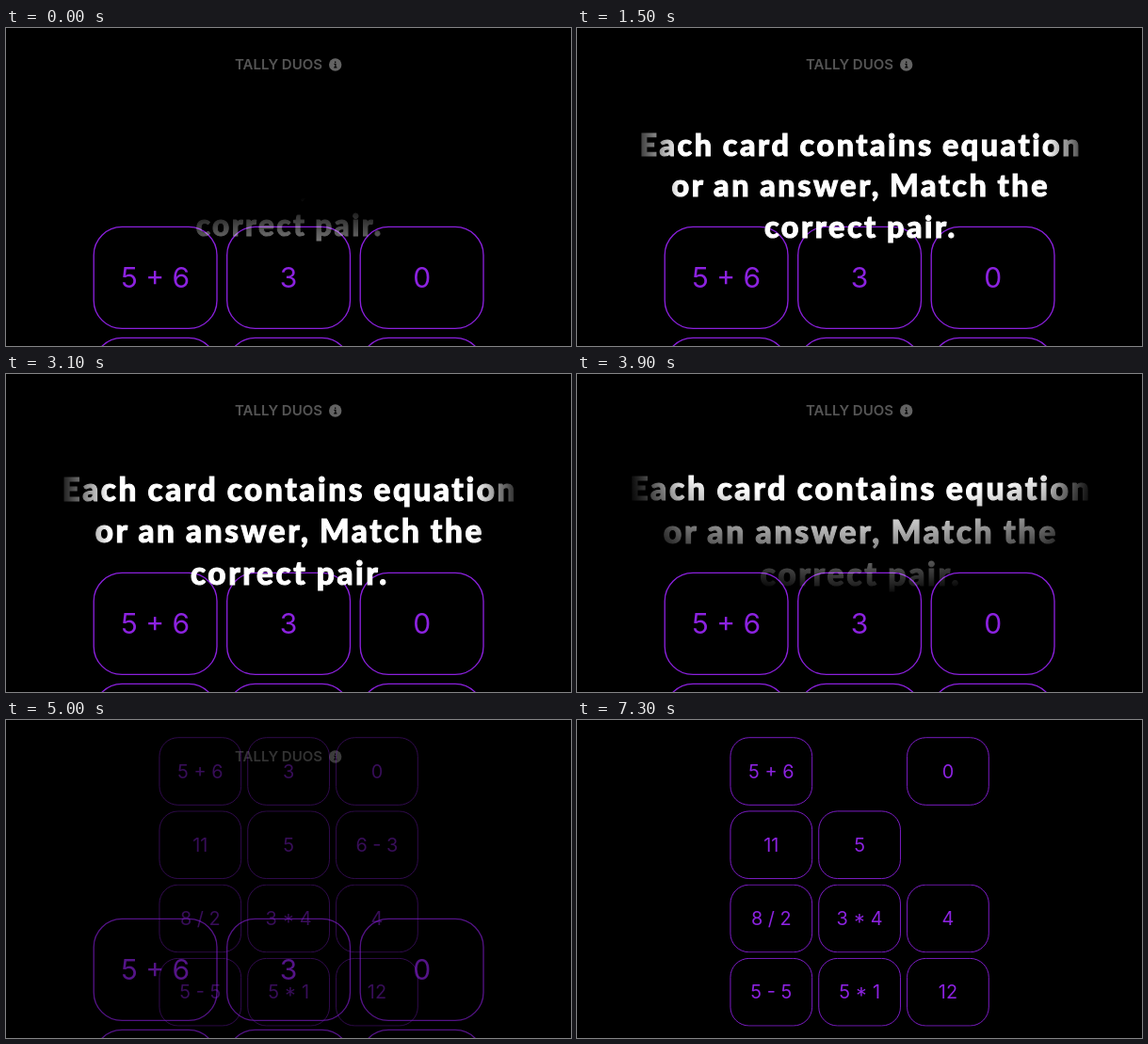
Animation of 600x338 px, one loop 8 s. Source, as an HTML page:

```html
<!DOCTYPE html>
<html lang="en">
<head>
<meta charset="utf-8">
<style>
  html, body { margin: 0; width: 100%; height: 100%; overflow: hidden; background: #000; }
  svg { position: absolute; left: 0; top: 0; width: 600px; height: 338px; }
  text { text-anchor: middle; font-family: Inter, Roboto, sans-serif; }
  .title { font-size: 15px; font-weight: 600; fill: #555; }
  .card rect { fill: none; stroke: #8a20dc; stroke-width: 1.35; }
  .card text { font-size: 30px; fill: #8c22e0; }
  .card .on rect { fill: url(#glow); stroke: none; }
  .card .on text { fill: #08000f; }
  #hint text {
    font: 800 32px Lato, "Open Sans", sans-serif;
    letter-spacing: 2.5px; word-spacing: -1px;
    fill: #fff; stroke: #fff; stroke-width: 1;
  }
  #hint { mask-composite: intersect; }
</style>
</head>
<body>
<svg viewBox="0 0 600 338">
  <defs>
    <linearGradient id="glow" x2="0" y2="1">
      <stop stop-color="#9424e4"/>
      <stop offset="1" stop-color="#490b9a"/>
    </linearGradient>
  </defs>
  <g id="intro">
    <text class="title" x="289.5" y="44.3">TALLY DUOS</text>
    <circle cx="349.7" cy="39" r="6.7" fill="#636363"/>
    <path d="M349.7 35.4v1.5M348.5 38.3h1.4v3.4M348.2 41.9h3.2" fill="none" stroke="#000" stroke-width="1.2"/>
    <g class="grid" transform="translate(300.1 211.4)"></g>
  </g>
  <g id="board">
    <g class="grid" transform="translate(300.1 18.7) scale(.663)"></g>
  </g>
</svg>
<svg id="hint" viewBox="0 0 600 338">
  <g id="lines">
    <text x="301.3" y="136">Each card contains equation</text>
    <text x="301.3" y="179">or an answer, Match the</text>
    <text x="301.3" y="222">correct pair.</text>
  </g>
</svg>
<script>
const LOOP = 8000, FEATHER = 100, WIPE_SPEED = 0.18, RADIUS = 616;
const labels = ['5 + 6', '3', '0', '11', '5', '6 - 3', '8 / 2', '3 * 4', '4', '5 - 5', '5 * 1', '12'];
const $ = id => document.getElementById(id);
const ramp = (t, from, to) => Math.min(1, Math.max(0, (t - from) / (to - from)));
const ease = x => x * x * (3 - 2 * x);

function card(label, i) {
  const face = `<rect x="-65.4" width="130.8" height="108" rx="30"/><text y="65">${label}</text>`;
  const x = (i % 3 - 1) * 141.5, y = Math.floor(i / 3) * 118;
  return `<g class="card" transform="translate(${x} ${y})">${face}<g class="on" opacity="0">${face}</g></g>`;
}
for (const grid of document.querySelectorAll('.grid')) grid.innerHTML = labels.map(card).join('');

const cards = $('board').querySelectorAll('.card');
const pair = [
  { el: cards[5], start: 5700, end: 6100 },
  { el: cards[1], start: 6700, end: 7050 }
];

function drawHint(t) {
  const scale = (227 + 0.0043 * t) / 231;
  $('lines').setAttribute('transform', `translate(300.5 168) scale(${scale}) translate(-300.5 -168)`);
  // Soft side edges, crossed with a large soft disc: it rises into view, then leaves upwards
  const sides = 'linear-gradient(90deg, transparent 54px, #000 110px, #000 498px, transparent 550px)';
  const centre = t < 2000
    ? 180 - WIPE_SPEED * t + RADIUS
    : 238 - WIPE_SPEED * (t - 3900) - RADIUS;
  const disc = `radial-gradient(circle at 300px ${centre}px, #000 ${RADIUS - FEATHER}px, transparent ${RADIUS}px)`;
  $('hint').style.maskImage = `${sides}, ${disc}`;
  $('hint').style.visibility = t < 4600 ? 'visible' : 'hidden';
}

function draw(now) {
  const t = now % LOOP;
  drawHint(t);
  const dissolve = ramp(t, 4550, 5700);
  $('intro').setAttribute('opacity', 1 - dissolve);
  $('board').setAttribute('opacity', dissolve);
  const gone = ease(ramp(t, 7000, 7300));
  for (const { el, start, end } of pair) {
    el.lastChild.setAttribute('opacity', ease(ramp(t, start, end)));
    el.setAttribute('opacity', 1 - gone);
  }
}

const begin = performance.now();
(function tick() {
  draw(performance.now() - begin);
  requestAnimationFrame(tick);
})();
</script>
</body>
</html>
```
